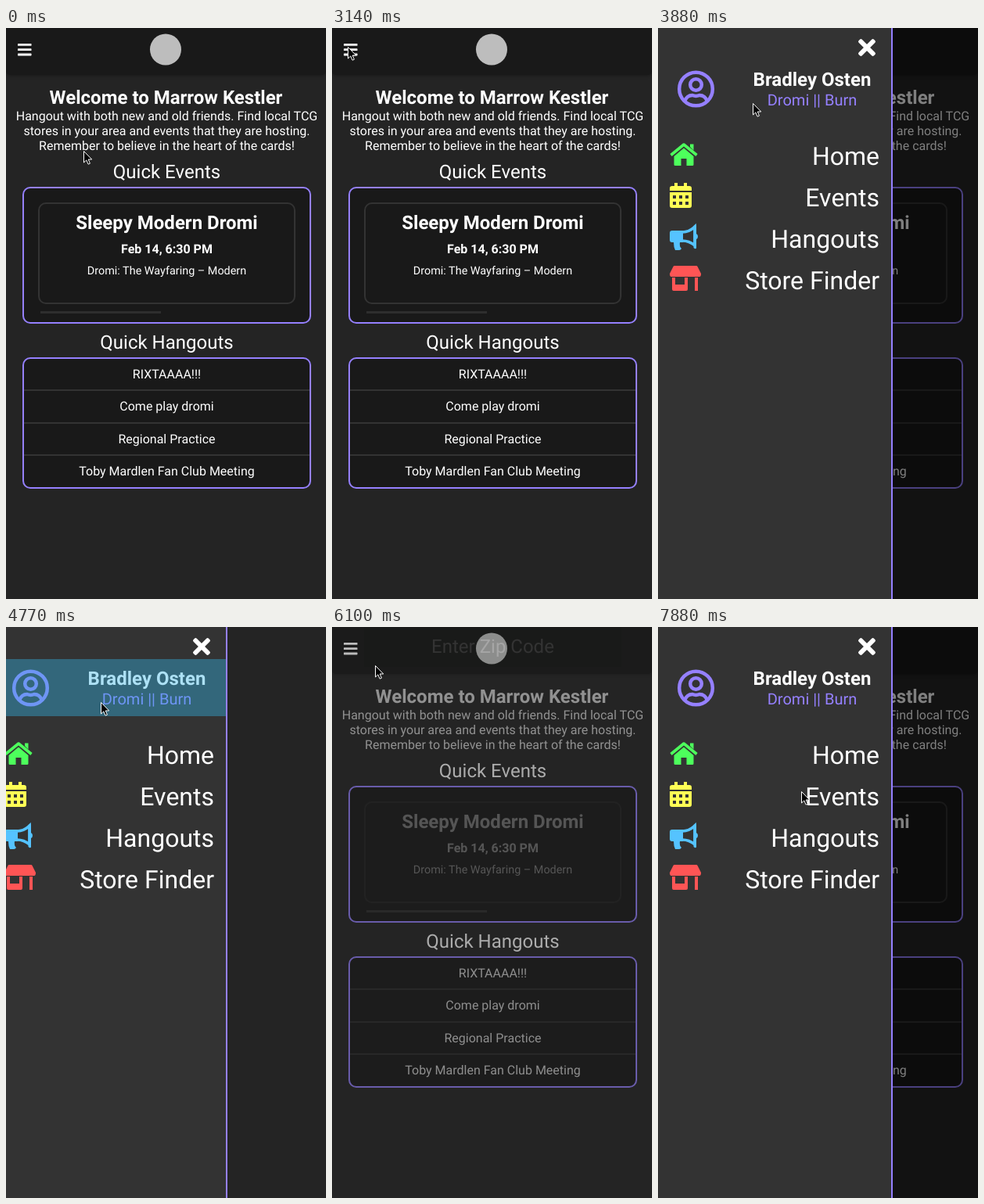
Animation of 409 by 730 pixels, one loop 8 s. Source, as an HTML page:

```html
<!DOCTYPE html>
<html lang="en">
<head>
<meta charset="utf-8">
<title>Game night app</title>
<style>
  :root { --purple: #9580ff; --line: #333; --dark: #191919; }
  * { box-sizing: border-box; }
  html, body { margin: 0; width: 100%; height: 100%; overflow: hidden; background: #242424; }
  body { position: relative; color: #fff; font: 16px/19px Roboto, sans-serif; text-rendering: geometricPrecision; }
  header, main, section, aside, svg, .t, .mask, .tap, .zip { position: absolute; }
  h1, h2, p, ul { margin: 0; padding: 0; }

  /* 1% of the loop is 80 ms; every state is held until the next one */
  .fade, .mask, .tap, .zip, aside, .cursor { animation: 8s step-end -30ms infinite; }
  .fade { animation-name: fade; }
  .mask { animation-name: dim; }
  .tap { animation-name: tap; }
  .zip { animation-name: zip; }
  aside { animation-name: slide; }
  .cursor { animation-name: point; }

  .t { left: 0; width: 409px; text-align: center; white-space: nowrap; }
  h1, h2 { font-size: 24px; line-height: 28px; }
  h2 { font-weight: 400; }

  header {
    inset: 0 auto auto 0; width: 409px; height: 60px; background: var(--dark);
    border-radius: 0 0 5px 5px; box-shadow: 0 1px 4px rgba(0, 0, 0, .3);
  }
  header svg { left: 0; top: 0; }
  main { inset: 0; }
  .box { left: 21px; width: 369px; border: 2px solid var(--purple); border-radius: 10px; background: var(--dark); overflow: hidden; }
  .events { top: 203px; height: 175px; }
  .card { left: 18px; top: 18px; width: 329px; height: 130px; border: 2px solid var(--line); border-radius: 10px; }
  .card .t { width: 325px; }
  .bar { left: 21px; top: 157px; width: 154px; height: 3px; background: #2e2e2e; }
  .hangouts { top: 421px; height: 168px; }
  ul { display: flex; flex-direction: column; height: 100%; margin-top: -.3px; list-style: none; }
  li { flex: 1; display: flex; align-items: center; justify-content: center; }
  li + li { border-top: 2px solid var(--line); flex-basis: 2px; }

  .zip { left: 41px; top: 0; width: 329px; height: 51px; background: #121a0e; opacity: 0; text-align: center; font-size: 24px; line-height: 50px; }
  .mask { inset: 0; background: #000; opacity: 0; }
  aside { left: 0; top: 0; width: 300px; height: 100%; background: #333; border-right: 2px solid var(--purple); translate: -300px; }
  aside svg { left: 0; top: 0; }
  aside .who { left: 97px; width: 200px; }
  aside .item { left: auto; right: 15px; width: auto; font-size: 32px; line-height: 38px; }
  .tap { left: 0; top: 41px; width: 298px; height: 73px; background: rgba(51, 181, 229, .4); opacity: 0; }
  .cursor { left: 0; top: 0; overflow: visible; translate: 99px 157px; }

  @keyframes fade {
    59.625% { opacity: 0; }
    76.25% { opacity: var(--o); }
    78.125% { opacity: calc(.5 + var(--o) / 2); }
    80% { opacity: 1; }
  }
  @keyframes zip {
    61.5% { opacity: .3; }
    63.375% { opacity: .7; }
    65.125% { opacity: 1; }
    76.25% { opacity: .35; }
    78.125% { opacity: 0; }
  }
  @keyframes dim {
    41% { opacity: .3; }
    42.875% { opacity: .5; }
    59.625% { opacity: 0; }
    87.25% { opacity: .36; }
    89.125% { opacity: .5; }
  }
  @keyframes tap {
    59.625% { opacity: 1; }
    61.5% { opacity: .5; }
    63.375% { opacity: 0; }
  }
  @keyframes slide {
    41% { translate: -178px; }
    42.875% { translate: -44px; }
    44.75% { translate: -5px; }
    46.625% { translate: 0; }
    59.625% { translate: -17px; }
    61.5% { translate: -189px; }
    63.375% { translate: -276px; }
    65.125% { translate: -300px; }
    87.25% { translate: -200px; }
    89.125% { translate: -54px; }
    91% { translate: -7px; }
    92.875% { translate: 0; }
  }
  @keyframes point {
    1.875% { translate: 101px 157px; }
    3.75% { translate: 102px 158px; }
    5.625% { translate: 103px 158px; }
    30% { translate: 107px 158px; }
    31.75% { translate: 104px 150px; }
    33.625% { translate: 85px 115px; }
    35.5% { translate: 55px 65px; }
    37.375% { translate: 30px 32px; }
    39.125% { translate: 20px 24px; }
    41% { translate: 19px 23px; }
    44.75% { translate: 45px 50px; }
    46.625% { translate: 100px 87px; }
    48.5% { translate: 121px 96px; }
    65.125% { translate: 112px 90px; }
    67% { translate: 95px 76px; }
    68.875% { translate: 76px 62px; }
    70.75% { translate: 61px 53px; }
    72.625% { translate: 55px 49px; }
    78.125% { translate: 50px 44px; }
    80% { translate: 36px 34px; }
    81.875% { translate: 24px 26px; }
    83.625% { translate: 21px 24px; }
    87.25% { translate: 65px 56px; }
    89.125% { translate: 120px 150px; }
    91% { translate: 155px 240px; }
    92.875% { translate: 162px 264px; }
    96.625% { translate: 170px 240px; }
    98.5% { translate: 183px 210px; }
  }
</style>
</head>
<body>
  <div class="zip">Enter Zip Code</div>

  <header class="fade" style="--o: .7">
    <svg width="409" height="60">
      <g fill="#fff">
        <rect x="15" y="20" width="17.500" height="2.800" rx=".6"/>
        <rect x="15" y="26.300" width="17.500" height="2.800" rx=".6"/>
        <rect x="15" y="32.600" width="17.500" height="2.800" rx=".6"/>
      </g>
      <circle cx="204" cy="27.5" r="20" fill="#bdbdbd"/>
    </svg>
  </header>

  <main>
    <div class="fade" style="--o: .5">
      <h1 class="t" style="top: 75px">Welcome to Marrow Kestler</h1>
      <p class="t" style="top: 103px; left: 1px">Hangout with both new and old friends. Find local TCG<br>stores in your area and events that they are hosting.<br>Remember to believe in the heart of the cards!</p>
    </div>

    <h2 class="t fade" style="top: 170px; left: 1px; --o: .62">Quick Events</h2>
    <section class="box events fade" style="--o: .62">
      <section class="card fade" style="--o: .4">
        <h1 class="t" style="top: 10px">Sleepy Modern Dromi</h1>
        <b class="t" style="top: 48px">Feb 14, 6:30 PM</b>
        <p class="t" style="top: 76px; font-size: 14.4px">Dromi: The Wayfaring – Modern</p>
      </section>
      <section class="bar"></section>
    </section>

    <h2 class="t fade" style="top: 388px; left: 1px; --o: .62">Quick Hangouts</h2>
    <section class="box hangouts fade" style="--o: .62">
      <ul class="fade" style="--o: .8">
        <li>RIXTAAAA!!!</li>
        <li>Come play dromi</li>
        <li>Regional Practice</li>
        <li>Toby Mardlen Fan Club Meeting</li>
      </ul>
    </section>
  </main>

  <div class="mask"></div>

  <aside>
    <svg width="298" height="350" fill="none">
      <g fill="#fff" transform="translate(267 25) rotate(45)">
        <rect x="-13.700" y="-2.950" width="27.400" height="5.900" rx="2"/>
        <rect x="-2.950" y="-13.700" width="5.900" height="27.400" rx="2"/>
      </g>
      <g stroke="#9580ff" stroke-width="4.5">
        <circle cx="48.5" cy="78" r="21.3"/>
        <circle cx="48.5" cy="72.5" r="7.3"/>
        <path d="M34 94c2-6 6-8 10-8 3 1.200 6 1.200 9 0 4 0 8 2 10 8"/>
      </g>
      <!-- house -->
      <g fill="#4dff5c">
        <path d="M20.500 164L33 153.500 45.500 164v10.500q0 1.500-1.500 1.500h-7.500v-9h-7v9H22q-1.500 0-1.500-1.500z"/>
        <path d="M41 148.500h4.500v8L41 152z"/>
        <path d="M16.500 162.500L33 149l16.500 13.500" fill="none" stroke="#4dff5c" stroke-width="3.600" stroke-linejoin="round"/>
      </g>
      <!-- calendar -->
      <g fill="#ffff55">
        <path d="M21 198h4v4h8v-4h4v4h3q3 0 3 3v3H15v-3q0-3 3-3h3z"/>
        <path d="M15 210h28v17q0 3-3 3H18q-3 0-3-3z"/>
        <path d="M19 214h4v4h-4zm8 0h4v4h-4zm8 0h4v4h-4zm-16 8h4v4h-4zm8 0h4v4h-4zm8 0h4v4h-4z" fill="#333"/>
      </g>
      <!-- megaphone -->
      <g fill="#55c3ff">
        <path d="M18 259h14v15h-4q-1 5 2 8-1 2-3 2h-5q-2-4-2-10h-2q-3 0-3-3v-9q0-3 3-3z"/>
        <path d="M31 261q9 0 16-7v24q-7-6-16-6" fill="none" stroke="#55c3ff" stroke-width="3.600"/>
        <path d="M45.500 253q3.500-3 3.500 0v10q2 1 2 3.500T49 270v10q0 4-3.500 1z"/>
      </g>
      <!-- store -->
      <g fill="#ff5555">
        <path d="M21 304h28q1 0 1.500 1l4.500 9q0 4-2 4H17q-2 0-2-4l4.500-9q.5-1 1.500-1z"/>
        <path d="M18 319h4v9h12v-9h4v15q0 2-2 2H20q-2 0-2-2zm29 0h4v17h-4z"/>
      </g>
    </svg>
    <b class="t who" style="top: 52px; font-size: 24px; line-height: 28px">Bradley Osten</b>
    <div class="t who" style="top: 80px; font-size: 20px; line-height: 24px; color: var(--purple)">Dromi || Burn</div>
    <div class="t item" style="top: 145px">Home</div>
    <div class="t item" style="top: 198px">Events</div>
    <div class="t item" style="top: 251px">Hangouts</div>
    <div class="t item" style="top: 304px">Store Finder</div>
    <div class="tap"></div>
  </aside>

  <svg class="cursor" width="12" height="18">
    <path d="M.5.5v14.500l3.300-3.100 2.300 5.300 2.300-1-2.200-5.200h4.500z" stroke="#fff" stroke-linejoin="round"/>
  </svg>
</body>
</html>
```
